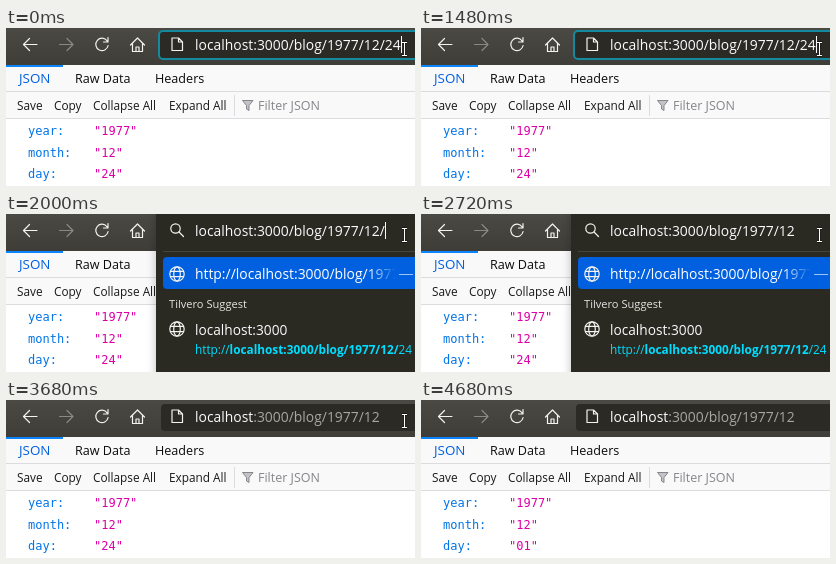
These frames come from a looping animation (409x158 px, 6.84 s). An HTML page:

```html
<!DOCTYPE html>
<html lang="en">
<head>
<meta charset="utf-8">
<title>Blog route</title>
<style>
html, body { margin: 0; width: 100%; height: 100%; overflow: hidden; background: #fff; }
svg { display: block; width: 409px; height: 158px; font-family: "Open Sans", "Noto Sans", sans-serif; }
text { white-space: pre; }
.icon { fill: none; stroke: #f4f3f0; stroke-width: 1.2; stroke-linecap: round; stroke-linejoin: round; }
.url { font-size: 13.9px; fill: #fbfbfe; }
.tab { font-size: 12.6px; fill: #0c0c0d; }
.tool { font-size: 11.8px; fill: #18181a; }
.json { font: 12px "DejaVu Sans Mono", monospace; fill: #0074e8; }
.json .val { fill: #dd00a9; }
</style>
</head>
<body>
<svg viewBox="0 0 409 158">
  <defs>
    <linearGradient id="bar" x2="0" y2="1">
      <stop stop-color="#4a4943"/><stop offset="1" stop-color="#3e3d38"/>
    </linearGradient>
    <linearGradient id="fade" gradientUnits="userSpaceOnUse" x1="388" x2="412">
      <stop stop-color="#fff"/><stop offset="1" stop-color="#fff" stop-opacity="0"/>
    </linearGradient>
    <filter id="shadow" x="-10%" y="-20%" width="120%" height="140%">
      <feDropShadow dx="0" dy="2" stdDeviation="5" flood-opacity=".25"/>
    </filter>
    <g id="globe" class="icon">
      <circle r="7.2"/><ellipse rx="3.3" ry="7.2"/><path d="M-6.500-2.600H6.500M-6.500 2.600H6.500"/>
    </g>
  </defs>

  <rect width="409" height="158" fill="#fff"/>
  <g id="page">
    <rect y="36" width="409" height="54" fill="#f9f9fa"/>
    <path d="M0 63.5H409M0 90.5H409M228.5 67V88" stroke="#dcdce0"/>
    <rect y="37" width="57" height="2" fill="#0a84ff"/>
    <g class="tab">
      <text x="13" y="55" style="fill:#0060df;font-size:13.4px">JSON</text>
      <text x="69" y="55">Raw Data</text>
      <text x="149" y="55">Headers</text>
    </g>
    <g class="tool">
      <text x="11" y="82">Save</text>
      <text x="48" y="82">Copy</text>
      <text x="87" y="82">Collapse All</text>
      <text x="163" y="82">Expand All</text>
      <text x="252" y="82" style="fill:#85858a;font-size:12.5px">Filter JSON</text>
    </g>
    <path d="M236.5 72.5h10.5l-4 5v5l-2.5-1.5v-3.5z" fill="#c4c4c8" stroke="#85858a"/>
    <g class="json">
      <text x="22" y="107">year:</text><text class="val" x="88" y="107">"1977"</text>
      <text x="22" y="129">month:</text><text class="val" x="88" y="129">"12"</text>
      <text x="22" y="150">day:</text><text id="day" class="val" x="88" y="150"></text>
    </g>
  </g>

  <rect width="409" height="37" fill="url(#bar)"/>
  <g class="icon">
    <path d="M31 16.5H17.5M23.5 10.5l-6 6 6 6"/>
    <path d="M53.5 16.5H67M61 10.5l6 6-6 6" opacity=".4"/>
    <path d="M101.2 13a6.200 6.200 0 1 0 .9 4.500M102 9.500v4.500h-4.500"/>
    <path d="M124.5 17l7-7 7 7M126.500 15.500v8h10v-8M130 23.500v-4.500h3v4.500"/>
  </g>
  <rect id="field" width="270" rx="4" fill="#2b2a24" stroke-width="2"/>

  <g id="panel">
    <rect id="sheet" y="-8" width="280" rx="4" fill="#2b2a24" filter="url(#shadow)"/>
    <path d="M157 37.5H409" stroke="#45443e"/>
    <rect x="157" y="43" width="260" height="32" rx="4" fill="#0060df"/>
    <use href="#globe" x="171" y="60"/>
    <text id="visit" class="url" x="189" y="65" style="fill:url(#fade)"></text>
    <path id="dash" d="M393 60.5h14" stroke="#9cc3f5"/>
    <g id="engines">
      <path d="M157 83.5H409" stroke="#45443e"/>
      <text x="163" y="112" font-size="13.550" fill="#fbfbfe">This time, search with:</text>
      <circle cx="171" cy="134" r="7.500" fill="#de5833"/>
      <path id="star" fill="#00ddff"/>
      <g class="icon" opacity=".85">
        <rect x="243.500" y="128.500" width="15" height="11" rx="1.500"/>
        <circle cx="290.500" cy="134" r="7"/><path d="M290.500 129.500v4.500h3.500"/>
      </g>
    </g>
    <g id="suggest">
      <text x="163" y="94" font-size="11.100" fill="#e4e4e2">Tilvero Suggest</text>
      <use href="#globe" x="171" y="115"/>
      <text class="url" x="189" y="121" style="font-size:13.7px">localhost:3000</text>
      <text x="189" y="140" font-size="11.800" fill="#00ddff">http://<tspan id="match" font-weight="700"></tspan><tspan id="rest"></tspan></text>
    </g>
  </g>

  <g class="icon">
    <path id="doc" d="M166 10h6.500l4 4v8.500h-10.500zM172.500 10v4h4"/>
    <g id="lens"><circle cx="169.500" cy="14.500" r="4.700"/><path d="M173 18l4.500 4.500"/></g>
  </g>
  <text id="url" class="url" x="189" y="21.500">localhost<tspan id="path"></tspan></text>
  <rect id="caret" y="8" width="1" height="17" fill="#fbfbfe"/>
  <g id="mouse" fill="none">
    <path id="beam" d="M-2.500-6.500h5M0-6.500v13M-2.500 6.500h5" stroke="#111" stroke-width="2.600"/>
    <use href="#beam" style="display:none"/>
    <path d="M-2.500-6.500h5M0-6.500v13M-2.500 6.500h5" stroke="#fff" stroke-width="1.100"/>
  </g>
</svg>
<script>
const LOOP = 6840, BASE = ':3000/blog/1977/12', FULL = BASE + '/24';
const $ = id => document.getElementById(id);
const set = (id, attrs) => { for (const k in attrs) $(id).setAttribute(k, attrs[k]); };
const show = (id, on) => set(id, { visibility: on ? 'inherit' : 'hidden' });
const write = (id, s) => { if ($(id).textContent !== s) $(id).textContent = s; };
const clamp = v => Math.max(0, Math.min(1, v));

const points = Array.from({ length: 10 }, (_, i) => {
  const a = i * Math.PI / 5, r = i % 2 ? 3.8 : 8.5;
  return (211 + r * Math.sin(a)).toFixed(2) + ' ' + (134.5 - r * Math.cos(a)).toFixed(2);
});
set('star', { d: 'M' + points.join('L') + 'Z' });

function draw(t) {
  const open = t >= 1720 && t < 3600;
  const listed = t >= 1800;
  const typed = t < 1720 ? FULL : t < 2000 ? BASE + '/2' : t < 2600 ? BASE + '/' : BASE;

  write('path', typed);
  $('path').style.fill = t >= 3640 ? '#a8a7a1' : '#fbfbfe';
  set('field', t < 1720
    ? { x: 153, y: 3, height: 28, stroke: '#138a9e' }
    : { x: 155, y: 4, height: 27, stroke: 'none' });
  const lens = t >= 1720 && t < 3640;
  show('lens', lens);
  show('doc', !lens);

  show('panel', open);
  const grow = clamp((t - 1720) / 120);
  set('sheet', { x: 152 - 2 * grow, height: listed ? 200 : 161 });
  show('engines', open && !listed);
  show('suggest', open && listed);
  show('dash', open && listed);
  set('fade', { x1: listed ? 362 : 388, x2: listed ? 390 : 412 });
  write('visit', 'http://localhost' + typed);
  const bold = t >= 2600 && t < 2720 ? BASE + '/' : typed;
  write('match', 'localhost' + bold);
  write('rest', FULL.slice(bold.length));

  show('caret', t < 240 || t >= 1480 && t < 2600);
  set('caret', { x: Math.round(189 + $('url').getComputedTextLength()) });

  show('page', t < 3720 || t >= 3760);
  write('day', t < 3720 ? '"24"' : '"01"');

  const p = clamp((t - 4440) / 240);
  set('mouse', { transform: `translate(${398.5 - 17 * p} ${21 - 30 * p * p})` });
  show('mouse', p < 1);
}

const start = performance.now();
function tick() {
  draw((performance.now() - start) % LOOP);
  requestAnimationFrame(tick);
}
tick();
</script>
</body>
</html>
```
